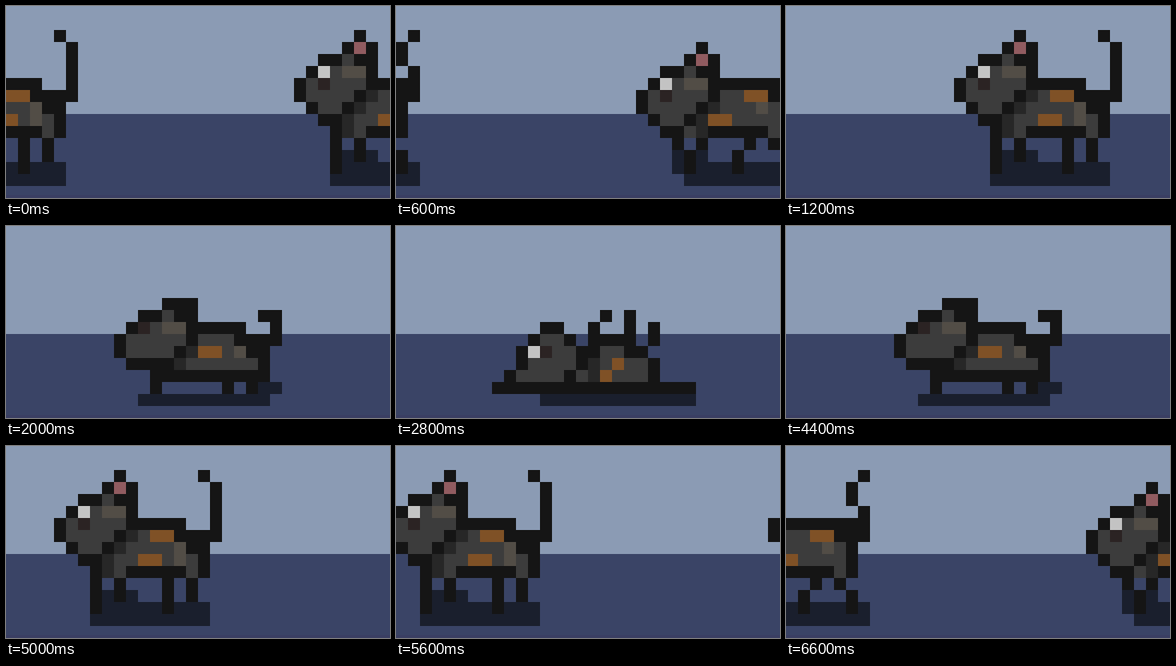
An HTML page with a canvas that plays this animation: 512 by 256 pixels, repeating every 6800 ms.

```html
<!DOCTYPE html>
<html lang="en">
<head>
<meta charset="utf-8">
<title>Walking cat</title>
<style>
html, body { margin: 0; width: 100%; height: 100%; overflow: hidden; }
canvas { display: block; width: 512px; height: 256px; }
</style>
</head>
<body>
<canvas id="stage" width="512" height="256"></canvas>
<script>
const ctx = document.getElementById('stage').getContext('2d');
const CELL = 16, COLS = 32, STEP = 200, STEPS = 34;
const SKY = '#8b9bb4', FLOOR = '#3a4466', EDGE = '#3a3f63', SHADOW = '#1a1f2d';
const BLACK = '#151515', DARK = '#272727', GREY = '#3c3c3c', ORANGE = '#7f5126';
const TAN = '#524d46', PINK = '#915b60', WHITE = '#c3c3c3', PUPIL = '#2b2323';

let left = 0, top_ = 0;
function box(color, x, y, w = 1, h = 1) {
  ctx.fillStyle = color;
  ctx.fillRect((left + x) * CELL, (top_ + y) * CELL, w * CELL, h * CELL);
}

function head(drop) {
  top_ = drop;
  box(BLACK, 5, 2);
  box(BLACK, 4, 3, 3);
  box(PINK, 5, 3);
  box(BLACK, 2, 4, 5);
  box(GREY, 4, 4);
  box(BLACK, 1, 5, 6);
  box(GREY, 3, 5);
  box(WHITE, 2, 5);
  box(TAN, 4, 5, 2);
  box(BLACK, 0, 6, 7);
  box(GREY, 1, 6, 5);
  box(PUPIL, 2, 6);
  box(BLACK, 0, 7, 6);
  box(GREY, 1, 7, 4);
  box(BLACK, 1, 8, 4);
  box(GREY, 2, 8, 2);
  box(BLACK, 2, 9, 2);
  top_ = 0;
}

function torso() {
  box(BLACK, 6, 6, 5);
  box(BLACK, 6, 7, 8);
  box(BLACK, 3, 8, 10, 3);
  box(GREY, 6, 8, 5);
  box(GREY, 5, 9, 7);
  box(GREY, 11, 10);
  box(DARK, 5, 8);
  box(TAN, 10, 8);
}

function stand() {
  box(SHADOW, 3, 13, 10, 2);
  box(SHADOW, 4, 12, 3);
  torso();
  box(DARK, 6, 7);
  box(GREY, 7, 7);
  box(ORANGE, 8, 7, 2);
  box(DARK, 4, 9, 1, 2);
  box(GREY, 5, 10);
  box(ORANGE, 7, 9, 2);
  box(TAN, 10, 9);
  for (const x of [3, 9]) {
    box(BLACK, x, 11, 1, 3);
    box(BLACK, x + 2, 11, 1, 2);
  }
  box(BLACK, 12, 2);
  box(BLACK, 13, 3, 1, 5);
  head(0);
}

// Feet are the columns where the four lower legs touch the floor.
function stride(feet) {
  box(SHADOW, 4, 13, 10, 2);
  box(SHADOW, 3, 12, 1, 2);
  box(SHADOW, 5, 12);
  torso();
  box(BLACK, 6, 6, 8);
  box(GREY, 7, 7, 2);
  box(ORANGE, 9, 7, 2);
  box(DARK, 6, 8);
  box(GREY, 11, 8);
  box(DARK, 5, 9, 1, 2);
  box(GREY, 4, 10);
  box(ORANGE, 6, 9, 2);
  for (const hip of [3, 5, 9, 11]) box(BLACK, hip, 11);
  for (const foot of feet) box(BLACK, foot, 12, 1, 2);
  box(BLACK, 13, 2);
  box(BLACK, 12, 3, 1, 2);
  box(BLACK, 13, 5, 1, 3);
  head(1);
}

function crouch() {
  box(SHADOW, 2, 14, 11);
  box(SHADOW, 12, 13, 2);
  box(BLACK, 4, 6, 3);
  box(BLACK, 2, 7, 5);
  box(GREY, 4, 7);
  box(BLACK, 1, 8, 10);
  box(PUPIL, 2, 8);
  box(GREY, 3, 8);
  box(TAN, 4, 8, 2);
  box(BLACK, 0, 9, 14);
  box(BLACK, 0, 10, 13);
  box(BLACK, 1, 11, 12);
  box(GREY, 1, 9, 5);
  box(GREY, 1, 10, 4);
  box(GREY, 7, 9, 3);
  box(DARK, 6, 10);
  box(ORANGE, 7, 10, 2);
  box(GREY, 9, 10);
  box(TAN, 10, 10);
  box(DARK, 5, 11);
  box(GREY, 6, 11, 6);
  box(BLACK, 3, 12, 10);
  for (const x of [3, 9, 11]) box(BLACK, x, 13);
  box(BLACK, 12, 7, 2);
  box(BLACK, 13, 8);
}

function rollOver(kick) {
  box(SHADOW, 4 - kick, 14, 13);
  box(BLACK, kick, 13, 17 - 2 * kick);
  box(BLACK, 4, 8, 2);
  box(BLACK, 3, 9, 4);
  box(GREY, 4, 9, 2);
  box(BLACK, 2, 10, 11);
  box(WHITE, 3, 10);
  box(PUPIL, 4, 10);
  box(GREY, 5, 10, 2);
  box(BLACK, 2, 11, 12);
  box(GREY, 3, 11, 4);
  box(BLACK, 1, 12, 13);
  box(GREY, 2, 12, 4);
  box(BLACK, 8, 9, 4);
  box(GREY, 9, 10, 2);
  box(GREY, 9, 11, 4);
  box(GREY, 7, 12, 6);
  box(DARK, 8, 11, 1, 2);
  box(ORANGE, 10, 11);
  box(ORANGE, 9, 12);
  box(BLACK, 8, 8);
  box(BLACK, 9 - kick, 7);
  box(BLACK, 11, 7 + kick, 1, 2 - kick);
  box(BLACK, 13, 8 - kick, 1, 2);
  if (kick) box(BLACK, 12, 9);
}

const poses = {
  A: stand,
  B: () => stride([4, 4, 8, 12]),
  C: () => stride([2, 6, 10, 10]),
  crouch,
  roll: () => rollOver(0),
  kick: () => rollOver(1)
};
const arrive = { gait: 'ACABAAAAAA', nose: [24, 24, 21, 20, 19, 16, 14, 11, 9, 9] };
const leave = { gait: 'AAAACABACAB', nose: [9, 7, 4, 2, 2, -1, -2, -3, -3, -6, -7] };

function poseAt(step) {
  if (step < 10) return [arrive.gait[step], arrive.nose[step]];
  if (step > 22) return [leave.gait[step - 23], leave.nose[step - 23]];
  if (step === 10 || step === 22) return ['crouch', 9];
  return [step % 2 ? 'kick' : 'roll', 8];
}

function draw(now) {
  const [pose, nose] = poseAt(Math.floor(now / STEP) % STEPS);
  left = 0;
  box(SKY, 0, 0, COLS, 9);
  box(FLOOR, 0, 9, COLS, 7);
  box(EDGE, 0, 15.75, COLS, 0.25);
  // The cat leaves on one side and re-enters on the other.
  const start = (nose + COLS) % COLS;
  for (left of [start, start - COLS]) poses[pose]();
  requestAnimationFrame(() => draw(performance.now() - begin));
}

const begin = performance.now();
draw(0);
</script>
</body>
</html>
```
